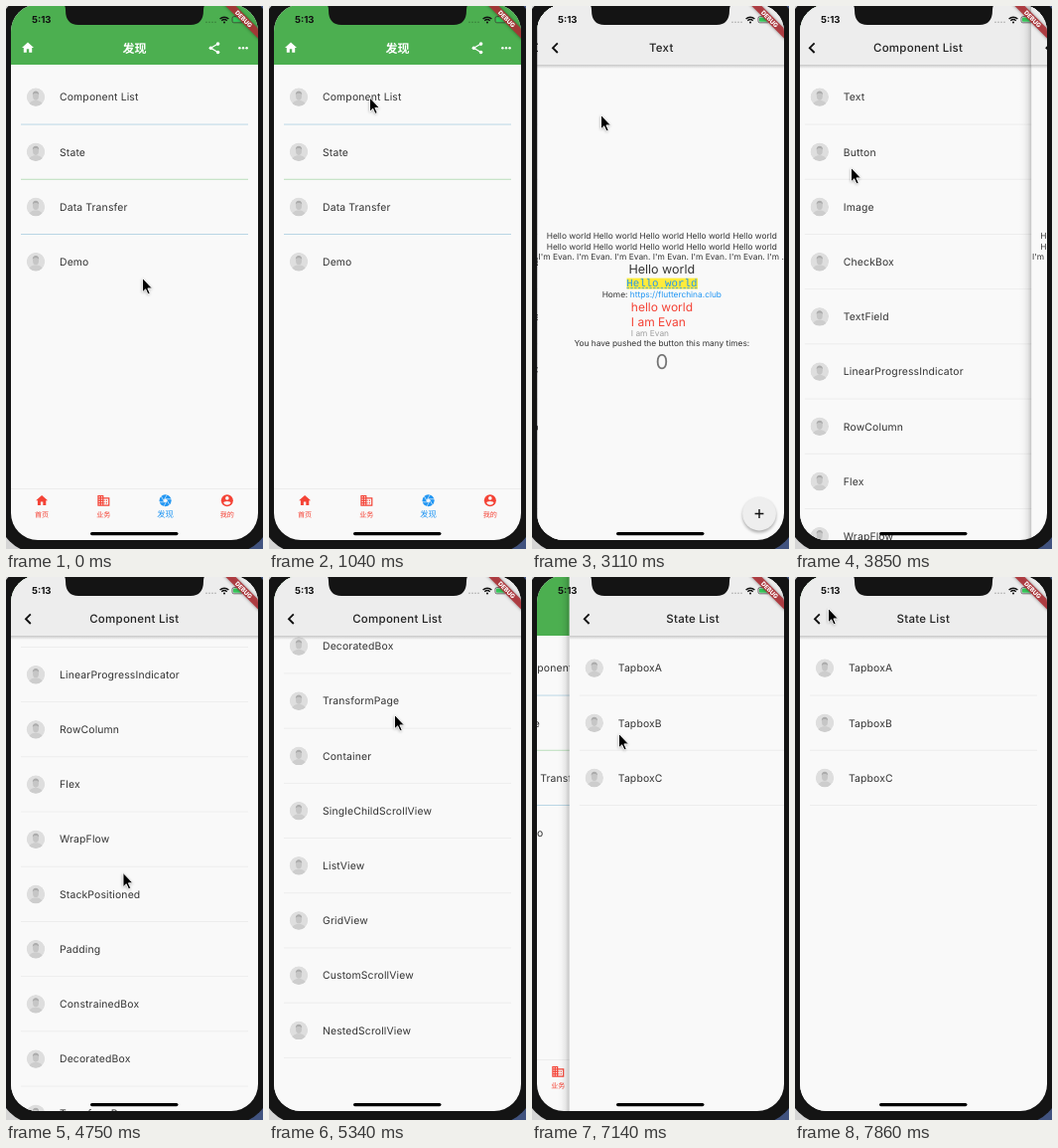
Recreate the animation shown at these times as an HTML page. Size 259 px wide and 546 px high, loop 8000 ms.

```html
<!DOCTYPE html>
<html lang="en">
<head>
<meta charset="utf-8">
<title>App walkthrough</title>
<style>
  html, body { margin: 0; width: 100%; height: 100%; overflow: hidden; background: #111; }
  svg { display: block; width: 100%; height: 100%; }
  text { font-family: Inter, "Noto Sans CJK SC", "Noto Sans CJK", sans-serif; fill: #333; white-space: pre; text-rendering: geometricPrecision; }
  .mid { text-anchor: middle; }
  .row { font-size: 10.4px; letter-spacing: .15px; }
  .title { font-size: 11.5px; font-weight: 500; letter-spacing: .25px; fill: #222; }
  .body { font-size: 8.35px; }
</style>
</head>
<body>
<svg id="stage" viewBox="0 0 259 546"></svg>
<script>
const W = 249, ROW = 55.2, LOOP = 8000, STEPS = 54;
const RED = '#f44336', BLUE = '#2196f3', GREEN = '#4caf50', PAPER = '#f9f9f9';

// Markup helpers
const rect = (x, y, w, h, fill, more = '') => `<rect x="${x}" y="${y}" width="${w}" height="${h}" fill="${fill}" ${more}/>`;
const dot = (x, y, r, fill, more = '') => `<circle cx="${x}" cy="${y}" r="${r}" fill="${fill}" ${more}/>`;
const path = (d, fill, more = '') => `<path d="${d}" fill="${fill}" ${more}/>`;
const text = (x, y, str, cls = '', style = '') => `<text x="${x}" y="${y}" class="${cls}" style="${style}">${str}</text>`;
const group = (id, inner) => `<g id="${id}">${inner}</g>`;
const times = (n, f) => Array.from({ length: n }, (_, i) => f(i)).join('');

// Icons on a 24 unit grid
const icons = {
  home: c => path('M10 20v-6h4v6h5v-8h3L12 3 2 12h3v8z', c),
  share: c => path('M18 5L6 12l12 7', 'none', `stroke="${c}" stroke-width="2"`) +
    dot(18, 5, 3, c) + dot(6, 12, 3, c) + dot(18, 19, 3, c),
  more: c => times(3, i => dot(6 + 6 * i, 12, 2, c)),
  work: c => path('M2 3h10v4h10v14H2z', c) +
    times(8, i => rect(4 + 4 * (i % 2), 5 + 4 * (i >> 1), 2, 2, PAPER)) +
    rect(12, 9, 8, 10, PAPER) +
    times(2, i => rect(12, 11 + 4 * i, 2, 2, c) + rect(16, 11 + 4 * i, 2, 2, c)),
  lens: c => dot(12, 12, 10, c) +
    times(6, i => path('M9.1 12L15 1.8', 'none', `stroke="${PAPER}" stroke-width="1" transform="rotate(${60 * i} 12 12)"`)) +
    dot(12, 12, 2.7, PAPER),
  user: c => dot(12, 12, 10, c) + dot(12, 8, 3, PAPER) + path('M6 16q0-3 6-3t6 3a7.2 7.2 0 0 1-12 0z', PAPER)
};
const icon = (name, x, y, color) => `<g transform="translate(${x - 7.2} ${y - 7.2}) scale(.6)">${icons[name](color)}</g>`;

const rows = (names, line = () => '#ececec') => names.map((name, i) => {
  const y = 91.5 + ROW * i, color = line(i);
  return `<use href="#avatar" x="30" y="${y}"/>` + text(54, y + 3.8, name, 'row') +
    (color ? rect(15, y + 27.1, 229, .9, color) : '');
}).join('');

const sheet = rect(5, -2, W, 540, PAPER);
const bar = title =>
  rect(5, 59, W, 4, 'url(#drop)') + rect(5, -2, W, 61, '#ededed') +
  path('M24.8 37.4L20 42.2l4.8 4.8', 'none', 'stroke="#111" stroke-width="1.9"') +
  text(129.3, 46.3, title, 'title mid');
const route = (id, title, inner) =>
  group(id, rect(-7.5, -2, 12.5, 540, 'url(#edge)') + sheet + inner + bar(title));

function homePage() {
  const tabs = [['home', '首页'], ['work', '业务'], ['lens', '发现'], ['user', '我的']];
  const nav = tabs.map(([name, label], i) => {
    const x = 36.1 + W / 4 * i, on = name === 'lens', color = on ? BLUE : RED;
    return icon(name, x, 497.3, color) +
      text(x, 514, label, 'mid', `font-size:${on ? 8.4 : 7.1}px;fill:${color}`);
  }).join('');
  return group('home', sheet + rect(5, -2, W, 61, GREEN) +
    icon('home', 22, 42, '#fff') + icon('share', 210, 42.3, '#fff') + icon('more', 239, 42.3, '#fff') +
    text(129.5, 46.5, '发现', 'mid', 'font-size:12px;font-weight:600;fill:#fff') +
    rows(['Component List', 'State', 'Data Transfer', 'Demo'], i => i < 3 && (i % 2 ? '#b4dcb6' : '#b3d3e4')) +
    rect(5, 485, W, .9, '#ececec') + nav);
}

function textPage() {
  const center = (y, str, style) => text(129.8, y, str, 'body mid', style);
  const left = (y, str, size, fill) => text(98.8, y, str, '', `font-size:${size}px;fill:${fill}`);
  const hello = Array(5).fill('Hello world').join(' ');
  return route('text', 'Text',
    center(234.4, hello) + center(244.6, hello) +
    text(5.5, 254.9, "I'm Evan. ".repeat(6) + "I'm …", 'body') +
    center(269.3, 'Hello world', 'font-size:12.5px') +
    rect(94.5, 273.6, 71.5, 11, '#ffeb3b') +
    center(282.2, 'Hello world', `font:10.8px 'Liberation Mono',monospace;fill:${BLUE}`) +
    path('M94.5 283.6h71.5', 'none', `stroke="${BLUE}" stroke-width=".8" stroke-dasharray="2.4 1.4"`) +
    center(293.4, `Home: <tspan fill="${BLUE}">https://flutterchina.club</tspan>`) +
    left(307.2, 'hello world', 12, RED) + left(321.6, 'I am Evan', 12, RED) + left(332.2, 'I am Evan', 8.35, '#9e9e9e') +
    center(342.4, 'You have pushed the button this many times:') +
    center(364.5, '0', 'font-size:20.4px;fill:#757575') +
    dot(228, 512.5, 17, '#000', 'opacity=".3" filter="url(#soft)"') + dot(228, 510.5, 16.9, '#eee') +
    path('M223.6 510.5h8.8M228 506.1v8.8', 'none', 'stroke="#111" stroke-width="1.4"'));
}

const components = ['Text', 'Button', 'Image', 'CheckBox', 'TextField', 'LinearProgressIndicator', 'RowColumn', 'Flex',
  'WrapFlow', 'StackPositioned', 'Padding', 'ConstrainedBox', 'DecoratedBox', 'TransformPage', 'Container',
  'SingleChildScrollView', 'ListView', 'GridView', 'CustomScrollView', 'NestedScrollView'];

const fade = (id, more, alphas) => `<linearGradient id="${id}" ${more}>` +
  alphas.map((a, i) => `<stop offset="${i / (alphas.length - 1)}" stop-opacity="${a}"/>`).join('') + '</linearGradient>';

const defs = `<defs>
  <clipPath id="screen"><rect x="5" y="-1.5" width="${W}" height="538.5" rx="27"/></clipPath>
  <clipPath id="round"><circle r="9.3"/></clipPath>
  ${fade('edge', '', [0, .016, .07, .22])}
  ${fade('drop', 'x2="0" y2="1"', [.2, 0])}
  <filter id="soft" x="-50%" y="-50%" width="200%" height="200%"><feGaussianBlur stdDeviation="1.8"/></filter>
  <g id="avatar"><g clip-path="url(#round)">
    ${dot(0, 0, 9.3, '#dedede')}
    ${path('M-7 10c0-5 3-6.5 7-6.5S7 5 7 10z', '#cdcdcd')}
    <ellipse cy="-1.2" rx="3" ry="4.4" fill="#c6c6c6"/>
    ${path('M-3.2-2C-3.6-7.4 3.6-7.4 3.2-2 2.5-4.4-2.5-4.4-3.2-2z', '#ababab')}
  </g></g>
</defs>`;

const status =
  text(26, 17.2, '5:13', '', 'font-size:9.6px;font-weight:700;fill:#111') +
  times(4, i => dot(202 + i * 3, 16.2, .8, '#000', 'opacity=".3"')) +
  path('M215.6 13a6.4 6.4 0 0 1 8.8 0M217.3 14.8a4 4 0 0 1 5.4 0', 'none', 'stroke="#111" stroke-width="1.4"') +
  dot(220, 16.5, 1, '#111') +
  rect(228, 10.6, 11, 6.2, 'none', 'rx="1.6" stroke="#333" stroke-width=".7"') + rect(229, 11.6, 8.5, 4.2, '#35c759', 'rx=".8"') +
  `<g transform="translate(239.5 13) rotate(45)">
    ${rect(-26, -3.6, 52, 7.2, '#000', 'opacity=".4" filter="url(#soft)"')}
    ${rect(-26, -3.6, 52, 7.2, '#b03036', 'opacity=".88"')}
    ${text(0, 2.2, 'DEBUG', 'mid', 'font-size:6.1px;font-weight:800;fill:#fff')}
  </g>`;

const stage = document.getElementById('stage');
stage.innerHTML = defs +
  rect(0, 0, 130, 546, '#d5d5d5') + rect(130, 0, 129, 546, '#41537f') +
  rect(-8, -13, 275, 563, '#141414', 'rx="40"') +
  '<g clip-path="url(#screen)">' +
    homePage() +
    route('list', 'Component List', group('scroll', rows(components))) +
    textPage() +
    route('state', 'State List', rows(['TapboxA', 'TapboxB', 'TapboxC'])) +
    status + rect(85, 529, 88.5, 3.2, '#000', 'rx="1.6"') +
  '</g>' +
  path('M57-2q3 1 3 6 0 15 13 15h113q13 0 13-15 0-5 3-6z', '#141414') +
  group('cursor',
    path('M0 1v15l3.4-3 2.4 5 2-1-2.2-5h5z', '#000', 'opacity=".3" filter="url(#soft)"') +
    path('M.5 .5v14.3l3.2-3 2.3 5.1 2.2-1-2.3-5h4.5z', '#000', 'stroke="#fff" stroke-width=".9"'));

const parts = Object.fromEntries(['home', 'list', 'text', 'state', 'scroll', 'cursor']
  .map(id => [id, document.getElementById(id)]));

const span = (k, from, to) => Math.min(1, Math.max(0, (k - from) / (to - from)));
const smooth = p => p * p * (3 - 2 * p);
const cover = (k, push, pop = Infinity) =>
  (1 - (1 - span(k, push, push + 3)) ** 5) * (pop < Infinity ? (1 - span(k, pop, pop + 4)) ** 2 : 1);

// Where the hand pauses: step, x, y
const stops = [
  [0, 137, 273], [4, 100, 55], [5, 101, 90], [8, 101, 92], [11, 101, 101], [16, 36, 51], [18, 64, 105], [21, 69, 109],
  [24, 22, 43], [26, 56, 162], [29, 112, 400], [36, 126, 138], [40, 22, 44], [42, 23, 53], [47, 87, 157], [50, 87, 157], [53, 33, 31]
];
function pointer(k) {
  const i = Math.max(1, stops.findIndex(stop => stop[0] >= k));
  const [from, x, y] = stops[i - 1], [to, x2, y2] = stops[i], p = smooth(span(k, from, to));
  return [x + (x2 - x) * p, y + (y2 - y) * p];
}

// A fling past the end, then the bounce back
const scroll = k => 684.5 * smooth(span(k, 29, 36)) - 48 * smooth(span(k, 36, 40));

const move = (part, x, y = 0) => part.setAttribute('transform', `translate(${x.toFixed(2)} ${y.toFixed(2)})`);

function draw(ms) {
  const k = Math.min(STEPS - 1, Math.floor(ms / LOOP * STEPS + .03));
  const list = cover(k, 8, 38.85), detail = cover(k, 19, 23), state = cover(k, 47);
  const slide = (id, shown, above = 0) => {
    parts[id].style.display = shown ? '' : 'none';
    move(parts[id], W * (1 - shown - above / 3));
  };
  slide('home', 1, Math.max(list, state));
  slide('list', list, detail);
  slide('text', detail);
  slide('state', state);
  move(parts.scroll, 0, -scroll(k));
  move(parts.cursor, ...pointer(k));
}

const start = performance.now();
function tick() {
  draw((performance.now() - start) % LOOP);
  requestAnimationFrame(tick);
}
tick();
</script>
</body>
</html>
```
